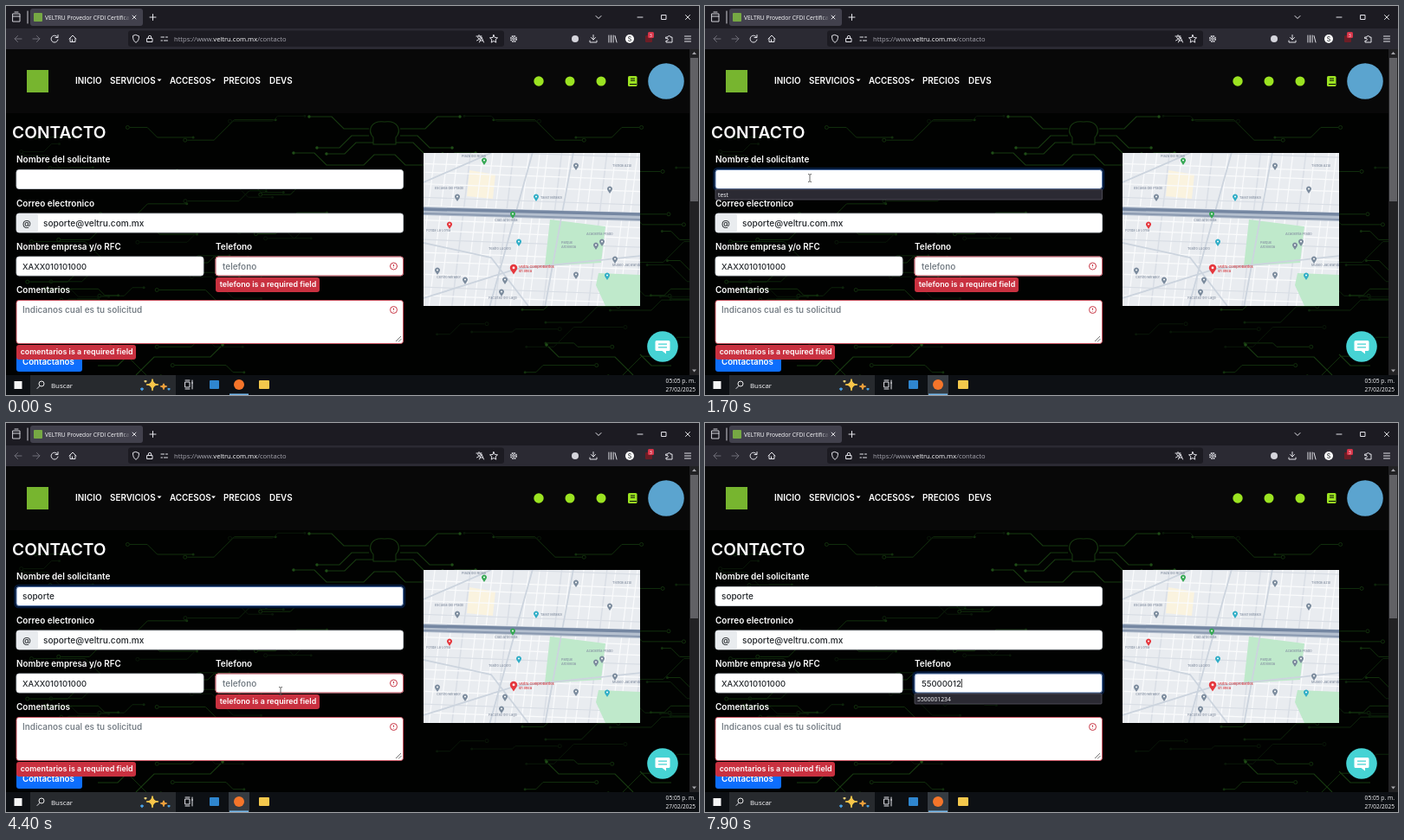
These frames come from a looping animation (800 px wide and 450 px high, 8000 ms). An HTML page:

```html
<!DOCTYPE html>
<html lang="es">
<head>
<meta charset="utf-8">
<title>Contacto</title>
<style>
html, body { margin: 0; width: 100%; height: 100%; overflow: hidden; background: #000; }
svg { display: block; width: 100vw; height: 100vh; }
text { font: 500 10px Inter, sans-serif; white-space: pre; }
.ui { font-family: "Open Sans", "Noto Sans", sans-serif; font-weight: 400; fill: #fbfbfe; }
.label { font-weight: 600; fill: #fff; }
.value { fill: #212529; }
.hint { fill: #6c757d; }
.line { fill: none; stroke: #e4e4ea; stroke-width: 1; stroke-linecap: round; stroke-linejoin: round; }
.place { fill: #8590a2; }
</style>
</head>
<body>
<svg id="stage" viewBox="0 0 800 450" xmlns="http://www.w3.org/2000/svg"></svg>
<script>
const stage = document.getElementById('stage');
const rect = (x, y, w, h, fill, r = 0, more = '') =>
  `<rect x="${x}" y="${y}" width="${w}" height="${h}" rx="${r}" fill="${fill}" ${more}/>`;
const disc = (x, y, r, fill, more = '') => `<circle cx="${x}" cy="${y}" r="${r}" fill="${fill}" ${more}/>`;
const path = (d, more = 'class="line"') => `<path d="${d}" ${more}/>`;
const stroke = (d, color, width) => path(d, `fill="none" stroke="${color}" stroke-width="${width}"`);
const text = (x, y, s, cls, size = 10, more = '') =>
  `<text x="${x}" y="${y}" class="${cls}" style="font-size:${size}px" ${more}>${s}</text>`;
const group = (id, body) => `<g id="${id}">${body}</g>`;

function random(seed) {
  return () => (seed = seed * 16807 % 2147483647) / 2147483647;
}

// Dim circuit traces, mirrored about the middle of the page
function circuit() {
  const rnd = random(77), mid = 437;
  let half = '';
  for (let i = 0; i < 46; i++) {
    const x = 20 + rnd() * 330, y = 132 + rnd() * 285;
    const run = 15 + rnd() * 45, drop = (rnd() - .5) * 50, tail = 8 + rnd() * 40;
    const bend = x + run + Math.abs(drop);
    const color = ['#091708', '#0d240b', '#12300d'][i % 3];
    half += stroke(`M${x} ${y}h${run}l${Math.abs(drop)} ${drop}h${tail}`, color, 1) +
      disc(x - 2.5, y, 2, 'none', `stroke="${color}"`) + disc(bend + tail, y + drop, 1.5, color);
  }
  const arcs = ['M437 134C421 132 417 144 424 152V160H437', 'M437 172H425L413 184H370L356 170H334',
    'M419 150H399L385 164H361', 'M424 158H404L391 171H372', 'M419 142H390L376 128H352',
    'M150 427L171 406H236L248 394', 'M106 416H129L142 403'];
  half += arcs.map(d => stroke(d, '#173a10', 1.1)).join('') +
    [[332, 170], [359, 164], [370, 171], [350, 128], [250, 392]]
      .map(([x, y]) => disc(x, y, 1.8, '#1f4d17')).join('');
  return `<g clip-path="url(#page)">${half}<g transform="translate(${2 * mid} 0) scale(-1 1)">${half}</g></g>`;
}

function map() {
  const rnd = random(31);
  let s = rect(482, 170, 250, 177, '#e9ecf0') + path('M535 190l30 5-3 28-30-3z', 'fill="#faf3df"');
  for (let i = 0; i < 22; i++) {
    const x = 470 + i * 13 + rnd() * 5;
    s += stroke(`M${x + 12} 168L${x - 10} 349`, i % 4 ? '#fafbfc' : '#d9dee5', i % 4 ? 1.2 : 1.5);
  }
  for (let i = 0; i < 15; i++) {
    const y = 165 + i * 13 + rnd() * 5;
    s += stroke(`M480 ${y}L734 ${y + 9}`, i % 4 ? '#fafbfc' : '#d9dee5', 1.2);
  }
  s += path('M628 247l64 8-5 42-65 4z M684 309l48 2v36h-40l-11-24z', 'fill="#bfe9cb"') +
    stroke('M482 338L590 304L734 289M482 274L560 291L603 347M608 169L558 349M655 169L622 349M482 204L560 170', '#ccd4de', 1.8) +
    stroke('M482 237L734 244', '#b4bfce', 10) + stroke('M482 235L734 241', '#7587a2', 3.5) +
    stroke('M482 240L734 247', '#8a99b0', 2);
  const pin = (x, y, color, k = 1) => path(
    `M${x} ${y + 4 * k}L${x - 2.6 * k} ${y}A${3 * k} ${3 * k} 0 1 1 ${x + 2.6 * k} ${y}Z`,
    `fill="${color}"`) + disc(x, y - 1.5 * k, k, '#fff');
  const gray = '#7a8a9c', teal = '#2fadc6', green = '#35a853', red = '#e5373d';
  const pins = [[552, 180, green], [658, 186, gray], [521, 222, gray], [612, 222, teal], [697, 213, gray],
    [585, 242, green], [512, 254, red], [592, 274, teal], [688, 274, gray], [681, 278, gray], [658, 312, gray],
    [530, 318, gray], [576, 318, gray], [572, 332, gray], [498, 307, gray], [703, 294, gray], [694, 313, teal]];
  s += pins.map(p => pin(...p)).join('') + pin(586, 305, red, 1.4);
  const places = [[526, 175, 'Plaza del Roble'], [495, 212, 'Escuela del Prado'], [617, 223, 'Taller Mirasol'],
    [564, 249, 'Club Arboleda'], [485, 261, 'Fonda La Loma'], [557, 282, 'Teatro Lucero'],
    [641, 275, 'Parque'], [641, 280, 'Arboleda'], [670, 265, 'Academia Prado'], [497, 315, 'Centro Mirador'],
    [557, 339, 'Facultad del Lago'], [700, 301, 'Museo Jacaranda'], [700, 186, 'Tienda Azul']];
  s += places.map(([x, y, name]) => text(x, y, name, 'place', 3.9)).join('') +
    `<g fill="#d3363b">${text(592, 303, 'Veltru Comprobantes', '', 4)}${text(592, 308, 'en linea', '', 4)}</g>`;
  return `<g clip-path="url(#map)">${s}</g>`;
}

function browser() {
  const gray = 'class="line" style="stroke:#6f6e78"';
  return rect(0, 0, 800, 26, '#1c1b22') + rect(0, 26, 800, 24, '#2b2a33') +
    rect(28, 3, 130, 20, '#42414d', 3) + rect(32, 8, 10, 10, '#76a844', 1) +
    text(45, 15.6, 'VELTRU Provedor CFDI Certifica', 'ui', 6.7) + rect(134, 5, 9, 16, 'url(#fade)') +
    path('M8 9h8v9h-8zM8 12h8M10 7h4M25 6v14', 'class="line" style="stroke-width:.9"') +
    path('M146 11l4 4m0-4l-4 4M166 13h7m-3.5-3.5v7M681 11.5l3 3 3-3M729 13h6M757 10.5h5v5h-5zM784.5 10.5l5 5m0-5l-5 5') +
    path('M18 38h-8l3.5-3.5m-3.5 3.5l3.5 3.5M31 38h8l-3.5-3.5m3.5 3.5l-3.5 3.5', gray) +
    path('M59.5 36a4 4 0 1 0 .5 3M60 33.5v3h-3M73 38l4-4 4 4M74 37.5v4h6v-4M76.5 41.5v-2.5') +
    rect(141, 28.5, 434, 18.5, '#1c1b22', 3) +
    path('M150 33.5l3.5 1.3c0 4-1 6-3.5 7.5c-2.5-1.5-3.5-3.5-3.5-7.5zM163 37.5h6v4h-6zM164.3 37.5v-1.5a1.7 1.7 0 0 1 3.4 0v1.5M179 36h3.5m2 0h2M179 40h1.5m2 0h4') +
    text(194, 41, '<tspan fill="#a9a9b2">https://www.</tspan>veltru.com.mx<tspan fill="#a9a9b2">/contacto</tspan>', 'ui', 7.6) +
    path('M543 35h6m-3-1.5v1.5m2 0c-.5 2.5-2 4-4.5 5m1-4c.5 1.5 1.5 2.5 2.5 3M546.5 42l2.5-6 2.5 6m-4-2h3') +
    path('M563 33.5l1.3 3 3.2.3-2.4 2.2.7 3.2-2.8-1.7-2.8 1.7.7-3.2-2.4-2.2 3.2-.3z') +
    disc(586, 38, 3.2, 'none', 'stroke="#e4e4ea" stroke-width="1.6" stroke-dasharray="1.7 .8"') +
    disc(586, 38, 1.3, 'none', 'stroke="#e4e4ea"') + disc(657, 38, 4, '#d5d5dc') +
    path('M678 33.5v5.5m-2.5-2.5l2.5 2.5 2.5-2.5M674 40v2h8v-2M696 34v8M698.5 34v8M701 34v8M703 34.5l2 7.5') +
    disc(720, 38, 5, '#fff') + text(720, 40.6, 'S', 'value', 7, 'text-anchor="middle"') +
    rect(738, 34, 8, 8, '#6d1d25', 1) + rect(741, 30, 7, 7, '#d73549', 1.5) + text(742.8, 35.5, '3', 'ui', 5.5) +
    path('M762 36h2a1.5 1.5 0 1 1 3 0h2v6h-7v-2a1.5 1.5 0 1 0 0-2.5zM783.5 35h7M783.5 38h7M783.5 41h7');
}

function nav() {
  const lime = '#9be321';
  const items = [[80, 'INICIO'], [120, 'SERVICIOS'], [189, 'ACCESOS'], [251, 'PRECIOS'], [304, 'DEVS']];
  return rect(0, 50, 789, 74, '#080808') + rect(24, 74, 25, 26, '#77b52f') +
    items.map(([x, s]) => text(x, 89.5, s, 'label', 9.9)).join('') +
    path('M174.5 84.5h5l-2.5 2.7zM237 84.5h5l-2.5 2.7z', 'fill="#fff"') +
    disc(615, 87, 5.7, lime) + disc(651, 87, 5.5, lime) + disc(687, 87, 5.5, lime) +
    rect(718, 81, 10.5, 12, lime, 1.5) +
    path('M721 84h5M721 86.2h5M720 90.5h8', 'stroke="#0a0b0b" fill="none"') +
    disc(762, 87, 20.8, '#5ba4cf');
}

const alertIcon = (x, y) => disc(x, y, 4, 'none', 'stroke="#c73645"') +
  path(`M${x} ${y - 2}v2.3m0 1.2v.5`, 'fill="none" stroke="#c73645" stroke-width="1.1"');
const error = (x, y, w, s) => rect(x, y, w, 17, '#c93140', 3) + text(x + 4.7, y + 11.4, s, 'label', 8.9);
const outline = (x, y, w, h, edge) => rect(x, y, w, h, 'none', 3, `stroke="${edge}" stroke-width=".9"`);
const field = (x, y, w, h, edge = '#ced4da') => rect(x, y, w, h, '#fff', 3) + outline(x, y, w, h, edge);
const glow = (id, x, y, w, h) => group(id,
  rect(x - 1.5, y - 1.5, w + 3, h + 3, 'none', 4, 'stroke="#04193a" stroke-width="2.4"') +
  outline(x, y, w, h, '#4a6ea8'));
const options = (id, x, y, w, s) => group(id,
  rect(x, y, w, 12, '#2b2a33', 1, 'stroke="#565560" stroke-width=".8"') + text(x + 3, y + 8.8, s, 'ui', 6.8));

function form() {
  const red = '#cf4a58';
  return text(7, 152.8, 'CONTACTO', 'label', 19.2) +
    text(12, 181, 'Nombre del solicitante', 'label') + field(12, 189.5, 446.5, 22) +
    glow('nameGlow', 12, 189.5, 446.5, 22) + text(19, 204, '', 'value', 10, 'id="name"') +
    text(12, 232, 'Correo electronico', 'label') + field(12, 240, 446.5, 22) +
    rect(12.5, 240.5, 24.5, 21, '#e9ecef', 2.5) + text(19, 254.6, '@', 'value') +
    text(43, 254.6, 'soporte@veltru.com.mx', 'value', 10.1) +
    text(12, 282, 'Nombre empresa y/o RFC', 'label', 9.8) + field(12, 290, 216, 22) +
    text(19, 304.6, 'XAXX010101000', 'value', 9.4) +
    text(242, 282, 'Telefono', 'label') + field(242, 290, 216.5, 22) +
    group('phoneError', outline(242, 290, 216.5, 22, red) + alertIcon(447.5, 301) +
      text(250, 304.8, 'telefono', 'hint') + error(242, 314, 120, 'telefono is a required field')) +
    glow('phoneGlow', 242, 290, 216.5, 22) + text(250, 304.8, '', 'value', 9.5, 'id="phone"') +
    text(12, 332, 'Comentarios', 'label') + field(12, 340.5, 446.5, 50, red) +
    text(19, 355, 'Indicanos cual es tu solicitud', 'hint') + alertIcon(447.5, 351.5) +
    path('M450 388l6-6M453 388.5l3.5-3.5', 'stroke="#777" fill="none"') +
    rect(12, 399, 76, 24, '#0d6efd', 3) + text(19, 415.3, 'Contactanos', 'label', 9.7) +
    error(12, 392, 138, 'comentarios is a required field');
}

function taskbar() {
  const spark = (x, y, r, color) => path(
    `M${x} ${y - r}Q${x} ${y} ${x + r} ${y}Q${x} ${y} ${x} ${y + r}Q${x} ${y} ${x - r} ${y}Q${x} ${y} ${x} ${y - r}`,
    `fill="${color}" stroke="${color}" stroke-width="1.5" stroke-linejoin="round"`);
  return rect(0, 427, 800, 23, '#0d1014') + rect(9.5, 434, 9, 9, '#f5f5f5') +
    rect(28, 427, 168, 23, '#272a2e') + disc(41, 437, 3, 'none', 'stroke="#eee"') + path('M39 439.5l-3 3') +
    text(52, 441.5, 'Buscar', 'ui', 7.9) +
    spark(169, 438, 6.5, '#f9c64a') + spark(182, 440, 3.3, '#f0a23c') + spark(157, 443, 1.4, '#4aa3e8') +
    spark(161, 434, 1, '#f3d37a') + spark(188, 443, 1, '#4aa3e8') +
    path('M207 435h5v6h-5zM207 433h5M207 443h5M215 433v10M214.5 436h1') +
    rect(235, 433, 11, 10, '#2f86cf', 1) +
    group('active', rect(257, 427, 24, 23, '#353b41')) + rect(258, 448.5, 22, 1.5, '#76b9ed') +
    disc(269, 438, 6, '#f5752a') + rect(292, 433, 12, 10, '#f4c84c', 1) +
    text(796, 435.5, '05:05 p. m.', 'ui', 6.7, 'text-anchor="end"') +
    text(796, 446, '27/02/2025', 'ui', 6.5, 'text-anchor="end"');
}

stage.innerHTML = `<defs>
  <clipPath id="page"><rect x="0" y="124" width="789" height="303"/></clipPath>
  <clipPath id="map"><rect x="482" y="170" width="250" height="177"/></clipPath>
  <linearGradient id="fade"><stop stop-color="#42414d" stop-opacity="0"/><stop offset="1" stop-color="#42414d"/></linearGradient>
  </defs>` + rect(0, 0, 800, 450, '#010201') + circuit() + nav() + browser() + map() + form() +
  options('nameList', 12, 212, 446.5, 'test') + options('phoneList', 242, 313, 216, '5500001234') +
  disc(758, 394, 17.8, '#46d3d4') +
  path('M751 387h14q1.5 0 1.5 1.5v9q0 1.5-1.5 1.5h-3v3.5l-4.5-3.5h-6.5q-1.5 0-1.5-1.5v-9q0-1.5 1.5-1.5z', 'fill="#fff"') +
  path('M753 391.2h10M753 394.8h10', 'stroke="#46d3d4" stroke-width="1.3"') +
  rect(789, 50, 11, 377, '#222224') + rect(790, 60, 9, 166, '#616165') +
  path('M792 56l2.5-3 2.5 3zM792 420.5l2.5 3 2.5-3z', 'fill="#a5a5aa"') + taskbar() +
  rect(0, 0, 1, 10, '#333', 0, 'id="caret"') +
  group('mouse', path('M-2-4.5Q0-4.5 0-3.5Q0-4.5 2-4.5M0-3.5V3.5M-2 4.5Q0 4.5 0 3.5Q0 4.5 2 4.5',
    'fill="none" stroke="#555" stroke-width=".9"'));

const $ = id => document.getElementById(id);
const show = (id, on) => $(id).style.opacity = +on;
const clamp = v => Math.min(1, Math.max(0, v));
const ease = v => (v = clamp(v)) * v * (3 - 2 * v);

const nameClick = 780, phoneClick = 4700, firstDigit = 5250;
const nameKeys = [...'soporte'].map((c, i) => 1850 + i * 100);
const phoneKeys = [firstDigit, 5600, ...[...'000012'].map((c, i) => 6350 + i * 280)];

function draw(t) {
  const typed = keys => keys.filter(k => k <= t).length;
  const inPhone = t >= phoneClick, n = typed(nameKeys), d = typed(phoneKeys);
  $('name').textContent = 'soporte'.slice(0, n);
  $('phone').textContent = '55000012'.slice(0, d);
  show('nameGlow', clamp((t - nameClick - 30) / 150) * clamp((phoneClick + 150 - t) / 150));
  show('phoneGlow', clamp((t - phoneClick) / 150));
  show('phoneError', d === 0);
  show('nameList', t >= 1200 && n === 0);
  show('phoneList', t >= 5050);
  show('active', t >= 500);

  const box = $(inPhone ? 'phone' : 'name');
  const width = (inPhone ? d : n) ? box.getComputedTextLength() : 0;
  const lastKey = Math.max(inPhone ? phoneClick : nameClick, ...[...nameKeys, ...phoneKeys].filter(k => k <= t));
  $('caret').setAttribute('x', (inPhone ? 250 : 19) + width);
  $('caret').setAttribute('y', inPhone ? 296 : 195.5);
  show('caret', t >= nameClick && (t - lastKey) % 1000 < 500);

  const arrive = ease((t - 550) / 200), cross = ease((t - 3700) / 650);
  const x = 150 - 29 * arrive + 196 * cross, y = 209 - 10 * arrive + 111 * cross;
  $('mouse').setAttribute('transform', `translate(${x} ${y - 7 * ease((t - 4450) / 200)})`);
  show('mouse', t >= 550 && n === 0 || t >= 3700 && d === 0);
}

function tick(now) {
  draw(now % 8000);
  requestAnimationFrame(tick);
}
requestAnimationFrame(tick);
</script>
</body>
</html>
```
